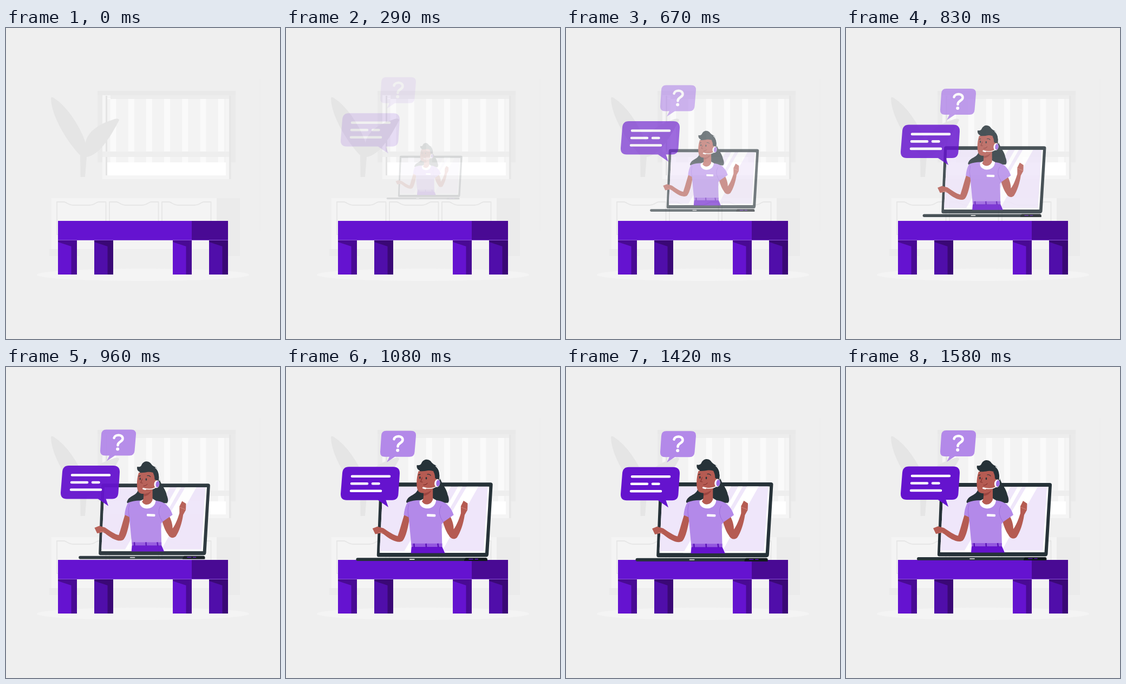
An HTML page for the animation above (1.62 s loop, 506 by 574 pixels).

```html
<!DOCTYPE html>
<html lang="en">
<head>
<meta charset="utf-8">
<title>Online support</title>
<style>
  html, body { margin: 0; width: 100%; height: 100%; overflow: hidden; background: #efefef; }
  svg { display: block; width: 100vw; height: 100vh; }
  .line { fill: none; stroke-linecap: round; stroke-linejoin: round; }
</style>
</head>
<body>
<svg viewBox="0 0 506 574">
  <defs>
    <path id="door" class="line" d="M94 381V321H107C114 322 113 327 126 327H153C165 327 164 322 171 321H184.500V381Z" stroke="#e6e6e6" stroke-width="1.800"/>
    <g id="leg">
      <path d="M0 392H35V455H0Z"/>
    </g>
    <clipPath id="glass"><path d="M180 221H374L366.500 342H174Z"/></clipPath>
  </defs>

  <g id="room">
    <path fill="#eeeeee" d="M467 95h3v280h-3z"/>
    <path fill="#eaeaea" d="M169 116H424V248H169Z"/>
    <path fill="#f5f5f5" d="M178 122H412V279H178Z"/>
    <path fill="#e6e6e6" d="M412 125h3.500V279h-3.500z"/>
    <path fill="#fff" d="M186 130H406V272H186Z"/>
    <path fill="#e4e4e4" d="M184 125h3V272h-3z"/>
    <path fill="#f3f3f3" d="M187 131H406V248H187Z"/>
    <g id="stripes" fill="#fafafa"></g>
    <path fill="#eeeeee" d="M178 228H412V238H178Z"/>
    <path fill="#e9e9e9" d="M169 116H424V124H169Z"/>
    <path fill="#ededed" d="M193 124H412V131H193Z"/>
    <path fill="#e5e5e5" d="M83 129C83 160 111 208 137 235L137.500 275H146L149 238C171 235 191 205 209 170C208 166 203 167 198 169C175 176 150 190 147 212C140 190 118 148 88 129Q84 126 83 129Z"/>
    <path fill="#ebebeb" d="M80 408H136V421H80ZM389 314H432V421H380V408H389Z"/>
    <path fill="#f4f4f4" d="M84 314H389V408H84Z"/>
    <use href="#door"/><use href="#door" x="97"/><use href="#door" x="194"/>
    <ellipse cx="253" cy="455.500" rx="196" ry="11.500" fill="#f4f4f4"/>
  </g>

  <g id="table">
    <path fill="#6513d0" d="M96 356H343V391H96Z"/>
    <path fill="#490a94" d="M343 356H410V391H343Z"/>
    <path fill="#8a52d6" d="M96 391H410V392H96Z"/>
  </g>

  <g id="laptop">
    <path fill="#263238" d="M178 214H376Q380.300 214 380 218L372.500 345Q372 349.500 368 349.500H172.500Q168.500 349.500 169 345L174 218Q174.300 214 178 214Z"/>
    <g clip-path="url(#glass)">
      <path fill="#fff" d="M170 220H380V345H170Z"/>
      <path fill="#efe6fa" d="M175 221H371L363.500 338.500H170Z"/>
      <path fill="#fff" d="M333 221H354L286 342H262ZM317 221H325L256 342H248ZM288 221H304L235 342H217Z"/>
    </g>
    <rect x="131" y="351" width="239.500" height="5.800" rx="2.900" fill="#263238"/>
    <path fill="#10171b" d="M331 351H368Q370.500 353 370.500 356.800H328Q328 353 331 351Z"/>
    <path class="line" stroke="#d5d5d5" stroke-width="1.800" d="M229 353.800H237"/>
    <path class="line" stroke="#5a16b8" stroke-width="1.600" d="M337 353.500H344M348 353.500H353"/>

    <g id="arms" fill="#b55b52">
      <path d="M219 272L229 276C226 295 222 313 216 320C208 326 193 318 181 308L177 306L166 308L161 297.500L170 294L181 297C190 303 200 310 207 311.500C211 300 214 288 219 272Z"/>
      <path d="M289 284L303 276C308 286 309 294 309 299C314 293 319 280 322 270L322 257L327 247L334.500 252L334 264L329 273C327 288 321 306 315 314C309 319 303 316 300 310C295 303 292 295 289 284Z"/>
      <path class="line" stroke="#df9a91" stroke-width=".7" d="M323 259L333 263M172 305L179 305"/>
    </g>
    <path id="hair" fill="#263238" d="M242 182C247 183 249 181 250 179C253 171 262 170 267 175C270 179 272 181 277 183C282 187 283 195 284 205C287 217 296 224 298 236C301 243 301 249 298 251H224Q221 250 224 245C229 236 241 237 244 225L247 192C242 190 241 185 242 182Z"/>
    <path id="shirt" fill="#b389e9" d="M225 250Q235 246 247 246H276Q286 247 293 251C301 256 306 264 309 273L290 286L287 290L288 331H232L227 277L218 273C219 264 221 256 225 250Z"/>
    <path class="line" stroke="#9c6bdb" stroke-width=".9" d="M286 256Q278 269 290 286M227 254Q224 265 227 277"/>
    <path fill="#9458df" d="M232 325H288V331.500H232.500Z"/>
    <path fill="#6513ce" d="M232 331H288L293 342.500H231Z"/>
    <path stroke="#5a12b8" stroke-width="2.500" d="M236.500 325L237 332M258.500 325L259 332M280 325L281 332"/>
    <rect x="260" y="271.500" width="16" height="4.500" rx="1.500" fill="#fff" transform="rotate(2 268 274)"/>
    <path fill="#fff" d="M247 247C243 264 275 268 277 246L270 242L253 244Z"/>
    <path fill="#b55b52" d="M254 228L271 223V245C267 256 255 256 251 248Q254 245 254 238Z"/>
    <path fill="#9b443f" d="M254 233Q263 233 269 227Q265 237 254 238Z"/>
    <path id="face" fill="#b55b52" d="M245 193C241 205 240 221 244 229C248 235 259 234 265 230Q272 226 275 221L281 208L277 196Q270 191 262 192Q251 194 245 193Z"/>
    <path fill="#263238" d="M272 194Q275 199 275 206L279 208L283 205L280 190Z"/>
    <g fill="#263238">
      <ellipse cx="247.500" cy="205" rx="1.200" ry="2.200"/>
      <ellipse cx="259" cy="206" rx="1.300" ry="2.300"/>
    </g>
    <path class="line" stroke="#263238" stroke-width="1.200" d="M245 200L248 199M261 199Q265 198 267 201"/>
    <path class="line" stroke="#84322f" stroke-width="1.100" d="M251.500 205Q250 210 248.500 212.500L252 213M254 218Q258 219 261 215"/>
    <path class="line" stroke="#fff" stroke-width="1.500" d="M276.500 184C283 189 285 199 283.500 208M278 220Q272 226 258 224"/>
    <path class="line" stroke="#fff" stroke-width="3" d="M253.500 223.500L257.500 224.500"/>
    <ellipse cx="279" cy="215" rx="5" ry="7.300" fill="#fff" transform="rotate(8 279 215)"/>
    <ellipse cx="280.500" cy="215" rx="3.400" ry="6" fill="#9d6be2" transform="rotate(8 280 215)"/>
  </g>

  <g class="bubble">
    <path fill="#b389e9" d="M185 117H231Q240.500 117 240 126L237.500 156Q237 165 228 165H201L186 175L191 165H183Q173.500 165 174 156L176 126Q176.500 117 185 117Z"/>
    <path class="line" stroke="#fff" stroke-width="4.600" d="M199.500 132.500C201 125.500 216 125 215.500 134C215 140 206.500 139 206.500 146"/>
    <circle cx="206.200" cy="153" r="3" fill="#fff"/>
  </g>
  <g class="bubble">
    <path fill="#6513ce" d="M116 183.500H198Q210.500 183.500 210 196L207.500 233Q207 245 196 245H184.500L189 258L170 245H112Q100.500 245 101 233L104 195Q105 183.500 116 183.500Z"/>
    <path class="line" stroke="#fff" stroke-width="4.600" d="M122 201H191M121 214.500H150M160 214.500H171.500M120 228H175"/>
  </g>
</svg>
<script>
  const LOOP = 1620, STEP = 1000 / 24, DURATION = 1500, LEAD = 12;
  const $ = id => document.getElementById(id);

  $('stripes').innerHTML = Array.from({ length: 7 }, (_, i) =>
    `<path d="M${192.5 + i * 33.2} 131h11v117h-11z"/>`).join('');

  const leg = (x, front, side) =>
    `<path fill="${front}" d="M${x} 392h35v63h-35z"/>` +
    `<path fill="${side}" d="M${x} 392h35v63h-10.5v-52l-24.500 -8z"/>`;
  $('table').innerHTML +=
    leg(96, '#6513d0', '#490a94') + leg(163, '#500eaa', '#3a0876') +
    leg(308, '#6513d0', '#490a94') + leg(375, '#500eaa', '#3a0876');

  const cubic = (a, b, t) => 3 * (1 - t) ** 2 * t * a + 3 * (1 - t) * t * t * b + t ** 3;

  // Entrance easing: cubic-bezier(.36, -.01, .5, 1.38), which overshoots
  function ease(x) {
    if (x <= 0) return 0;
    if (x >= 1) return 1;
    let lo = 0, hi = 1;
    for (let i = 0; i < 30; i++) {
      const mid = (lo + hi) / 2;
      if (cubic(.36, .5, mid) < x) lo = mid; else hi = mid;
    }
    return cubic(-.01, 1.38, lo);
  }

  const laptop = $('laptop'), bubbles = document.querySelectorAll('.bubble');

  function draw(now) {
    const step = Math.floor((now % LOOP + 5) / STEP);
    const p = step < 4 ? 0 : ease((step * STEP - LEAD) / DURATION);
    const opacity = Math.max(0, Math.min(1, p));
    laptop.setAttribute('opacity', opacity);
    laptop.setAttribute('transform', `translate(256 264) scale(${.5 + .5 * p}) translate(-256 -264)`);
    for (const bubble of bubbles) {
      bubble.setAttribute('opacity', opacity);
      bubble.setAttribute('transform', `translate(0 ${30 * (p - 1)})`);
    }
  }

  const start = performance.now();
  function tick() {
    draw(performance.now() - start);
    requestAnimationFrame(tick);
  }
  tick();
</script>
</body>
</html>
```
